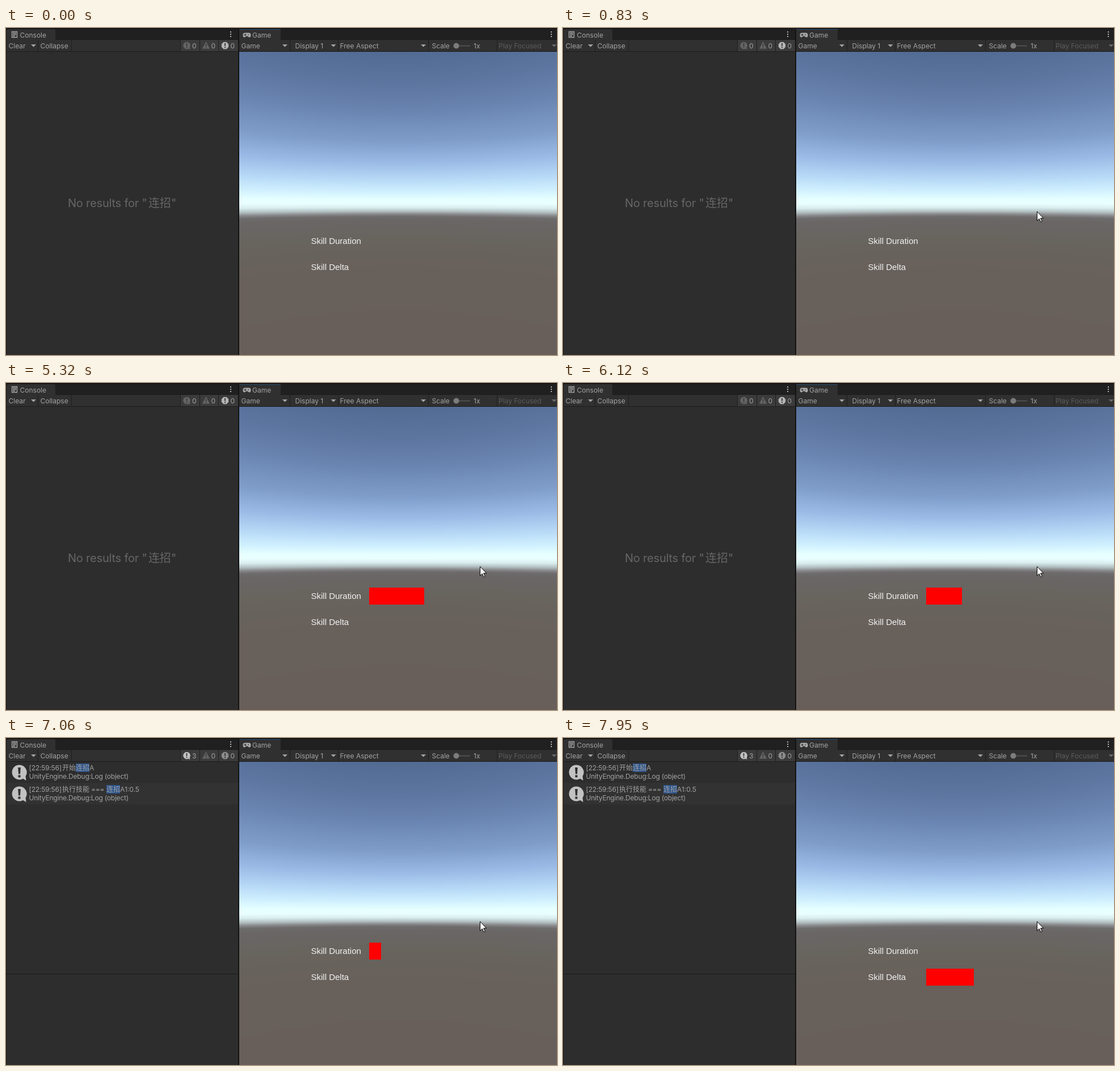
Write an HTML page with a canvas that moves like this. It is 971 by 577 pixels and loops after 8 s.

```html
<!DOCTYPE html>
<html lang="zh-CN">
<head>
<meta charset="utf-8">
<title>Console and game view</title>
<style>
html, body { margin: 0; width: 100%; height: 100%; overflow: hidden; background: #141414; }
canvas, svg { position: absolute; display: block; }
canvas { left: 411px; top: 42px; }
svg { left: 0; top: 0; }
text { font: 12px Inter, "Noto Sans CJK SC", "Noto Sans CJK", sans-serif; fill: #a3a3a3; white-space: pre; }
.dim { fill: #5c5c5c; }
.empty text { font-size: 20px; letter-spacing: -.2px; fill: #666; }
.log text { letter-spacing: -.2px; }
.skill { font: 15px "Liberation Sans", Arial, sans-serif; fill: #f2f2f2; }
</style>
</head>
<body>
<canvas id="sky" width="560" height="535"></canvas>
<svg width="971" height="577" viewBox="0 0 971 577">
  <defs>
    <path id="arrow" d="M-4.5-2h9L0 2.5z" fill="#a3a3a3"/>
    <g id="dots" fill="#b4b4b4"><path d="M-1-5h2v2h-2zM-1-1h2v2h-2zM-1 3h2v2h-2z"/></g>
    <path id="bubble" d="M0-13A13 13 0 1 0 6.5 11.3L12 14.5 11 7A13 13 0 0 0 0-13zM-2.3-8.500h4.600L1.500 3h-3zM-2 5h4v4h-4z" fill-rule="evenodd"/>
    <path id="warn" d="M0-6.500L6.500 6h-13zM-.9-2.500h1.800V2h-1.800zM-.9 3.200h1.800v1.600h-1.800z" fill-rule="evenodd"/>
    <path id="error" d="M-2.600-6.200h5.200L6.200-2.600v5.200L2.600 6.200h-5.200L-6.200 2.600v-5.200zM-1.100-4h2.200L.8 1h-1.600zM-1 2.200h2v2h-2z" fill-rule="evenodd"/>
  </defs>

  <!-- console panel -->
  <path d="M1 2h408v19H1zM411 2h560v19H411z" fill="#202020"/>
  <path d="M1 21V5q0-3 3-3h80q3 0 3 3v16zM411 21V2h73v19z" fill="#303030"/>
  <path d="M1 21h408v20H1zM411 21h560v20H411z" fill="#303030"/>
  <path d="M87 20.500h322M484 20.500h487M0 41.500h971" stroke="#1c1c1c"/>
  <path d="M411 2.500h73" stroke="#28517a"/>
  <path d="M1 42h408v535H1z" fill="#2d2d2d"/>
  <path d="M307 21h102v20H307z" fill="#3b3b3b"/>
  <path d="M56.500 21v20M115.500 21v20M307.500 21v20M341.500 21v20M374.500 21v20M500.500 21v20M585.500 21v20M744.500 21v20M865.500 21v20" stroke="#1f1f1f"/>
  <path d="M10.500 6.500h9v10h-9zM12 9h6M12 11.500h6M12 14h4" fill="none" stroke="#a8a8a8" stroke-width="1.300"/>
  <text x="24.500" y="17">Console</text>
  <text x="4.500" y="36">Clear</text>
  <text x="60.500" y="36">Collapse</text>
  <use href="#dots" x="396" y="11"/>
  <use href="#arrow" x="48.500" y="31"/>
  <use id="infoIcon" href="#bubble" transform="translate(318.500 31) scale(.48)"/>
  <use href="#warn" x="352.500" y="30.500" fill="#646464"/>
  <use id="errorIcon" href="#error" x="386" y="31"/>
  <text id="count" x="328" y="36">0</text>
  <text x="361.500" y="36">0</text>
  <text x="395.500" y="36">0</text>

  <g id="empty" class="empty">
    <text x="109" y="316">No results for "</text>
    <text x="251" y="316">连招</text>
    <text x="291" y="316">"</text>
  </g>
  <g id="log" class="log">
    <path d="M1 79h408v38H1z" fill="#323232"/>
    <path d="M123 45h24v15h-24zM177 83h24v15h-24z" fill="#30568c"/>
    <path d="M1 416.500h408" stroke="#1a1a1a"/>
    <g fill="#c2c2c2"><use href="#bubble" x="23.500" y="60.500"/><use href="#bubble" x="23.500" y="98.500"/></g>
    <text x="40.500" y="56.500">[22:59:56]</text>
    <text x="99" y="56.500" style="letter-spacing:0">开始连招A</text>
    <text x="40.500" y="71.500">UnityEngine.Debug:Log (object)</text>
    <text x="40.500" y="94.500">[22:59:56]</text>
    <text x="99" y="94.500" style="letter-spacing:0">执行技能</text>
    <text x="150" y="94.500">===</text>
    <text x="177" y="94.500" style="letter-spacing:0">连招A1:0.5</text>
    <text x="40.500" y="109.500">UnityEngine.Debug:Log (object)</text>
  </g>

  <!-- game panel -->
  <path d="M421 8.500h7q3.500 0 3.500 4t-2.500 4q-1.500 0-3-2h-3q-1.500 2-3 2-2.500 0-2.500-4t3.500-4zM419.500 11.500h1.500v-1.300h1.200v1.300h1.500v1.200h-1.500v1.300h-1.200v-1.300h-1.500zM426.500 11h1.500v1.500h-1.500z" fill="#a8a8a8" fill-rule="evenodd"/>
  <text x="434" y="17">Game</text>
  <text x="414.500" y="36">Game</text>
  <text x="509.500" y="36">Display 1</text>
  <text x="588.500" y="36">Free Aspect</text>
  <text x="750.500" y="36">Scale</text>
  <text x="824" y="36">1x</text>
  <text class="dim" x="868" y="36">Play Focused</text>
  <path d="M793 31.500h25" stroke="#505050" stroke-width="2"/>
  <circle cx="793.500" cy="31.500" r="5" fill="#7c7c7c"/>
  <use href="#arrow" x="491.500" y="31"/>
  <use href="#arrow" x="577" y="31"/>
  <use href="#arrow" x="735.500" y="31"/>
  <use href="#arrow" x="966" y="31" opacity=".5"/>
  <use href="#dots" x="961" y="11"/>

  <text class="skill" x="537.500" y="380.500">Skill Duration</text>
  <text class="skill" x="537.500" y="426.500">Skill Delta</text>
  <rect id="duration" x="640" y="361" height="30" fill="#f00"/>
  <rect id="delta" x="640" y="407" height="30" fill="#f00"/>

  <circle id="press" cx="835" cy="323" r="12" fill="#ff0" fill-opacity=".47"/>
  <path id="cursor" d="M.5.8V17l3.700-3.500 2.700 5.900 2.400-1-2.700-5.700h5.100z" fill="#fff" stroke="#000" stroke-linejoin="round"/>
</svg>
<script>
const LOOP = 8000;
const $ = id => document.getElementById(id);

// Value of a table of [position, value...] rows, linear between rows.
function sample(table, p) {
  if (p <= table[0][0]) return table[0].slice(1);
  for (let i = 1; i < table.length; i++) {
    const a = table[i - 1], b = table[i];
    if (p <= b[0]) {
      const k = (p - a[0]) / (b[0] - a[0]);
      return a.slice(1).map((v, j) => v + (b[j + 1] - v) * k);
    }
  }
  return table[table.length - 1].slice(1);
}

// Sine of the view elevation -> colour
const skyStops = [
  [-.5, 105, 95, 90], [-.25, 104, 96, 91], [-.13, 104, 100, 94], [-.065, 106, 102, 102],
  [-.05, 110, 107, 108], [-.041, 135, 135, 137], [-.03, 178, 191, 193], [-.016, 217, 237, 238],
  [0, 234, 255, 255], [.015, 230, 255, 255], [.043, 209, 241, 255], [.086, 186, 219, 247],
  [.15, 156, 188, 231], [.231, 127, 156, 201], [.327, 106, 133, 177], [.413, 92, 118, 160], [.5, 82, 107, 147]
];

function paintSky() {
  const { width: w, height: h } = $('sky');
  const ctx = $('sky').getContext('2d');
  const img = ctx.createImageData(w, h);
  const focal = h / 2 / Math.tan(Math.PI / 6);
  const steps = 4000;
  const ramp = Array.from({ length: steps + 1 }, (_, i) => sample(skyStops, i / steps - .5));
  for (let y = 0, o = 0; y < h; y++) {
    const dy = h / 2 - y - .5;
    for (let x = 0; x < w; x++, o += 4) {
      const s = dy / Math.hypot(focal, x + .5 - w / 2, dy);
      const c = ramp[Math.round((s + .5) * steps)];
      for (let j = 0; j < 3; j++) img.data[o + j] = Math.round(c[j]);
      img.data[o + 3] = 255;
    }
  }
  ctx.putImageData(img, 0, 0);
}

// Evenly spaced moments, both ends included
const span = (from, to, n) => Array.from({ length: n }, (_, i) => from + (to - from) * i / (n - 1));

const moveTicks = span(120, 830, 10);
const barTicks = [5320, ...span(5340, 6120, 10), ...span(6140, 6930, 11), 7030, 7060, ...span(7160, 7800, 9), 7850, 7950];
const durationKeys = [[5320, 97], [6120, 63], [7060, 21], [7600, 0]];
const deltaKeys = [[7625, 98], [7800, 91], [7950, 84]];
const logAt = 6535;

const held = (ticks, t) => ticks.reduce((last, tick) => tick <= t ? tick : last, -1);
const show = (id, on) => $(id).setAttribute('visibility', on ? 'visible' : 'hidden');

function draw(t) {
  const move = held(moveTicks, t);
  const left = 1 - (move - 120) / 710;
  const ease = left * left;
  $('cursor').setAttribute('transform', `translate(${Math.round(835 + 115 * ease)} ${Math.round(323 + 238 * ease)})`);
  show('cursor', move > 0);
  show('press', t >= 1780 && t < 2000);

  const tick = held(barTicks, t);
  $('duration').setAttribute('width', tick < 0 ? 0 : Math.round(sample(durationKeys, tick)[0]));
  $('delta').setAttribute('width', tick < 7625 ? 0 : Math.round(sample(deltaKeys, tick)[0]));

  const logged = t >= logAt;
  show('log', logged);
  show('empty', !logged);
  $('count').textContent = logged ? '3' : '0';
  $('infoIcon').setAttribute('fill', logged ? '#c2c2c2' : '#646464');
  $('errorIcon').setAttribute('fill', logged ? '#8a8a8a' : '#b4b4b4');
}

paintSky();
draw(0);
const start = performance.now();
function frame() {
  draw((performance.now() - start) % LOOP);
  requestAnimationFrame(frame);
}
requestAnimationFrame(frame);
</script>
</body>
</html>
```
